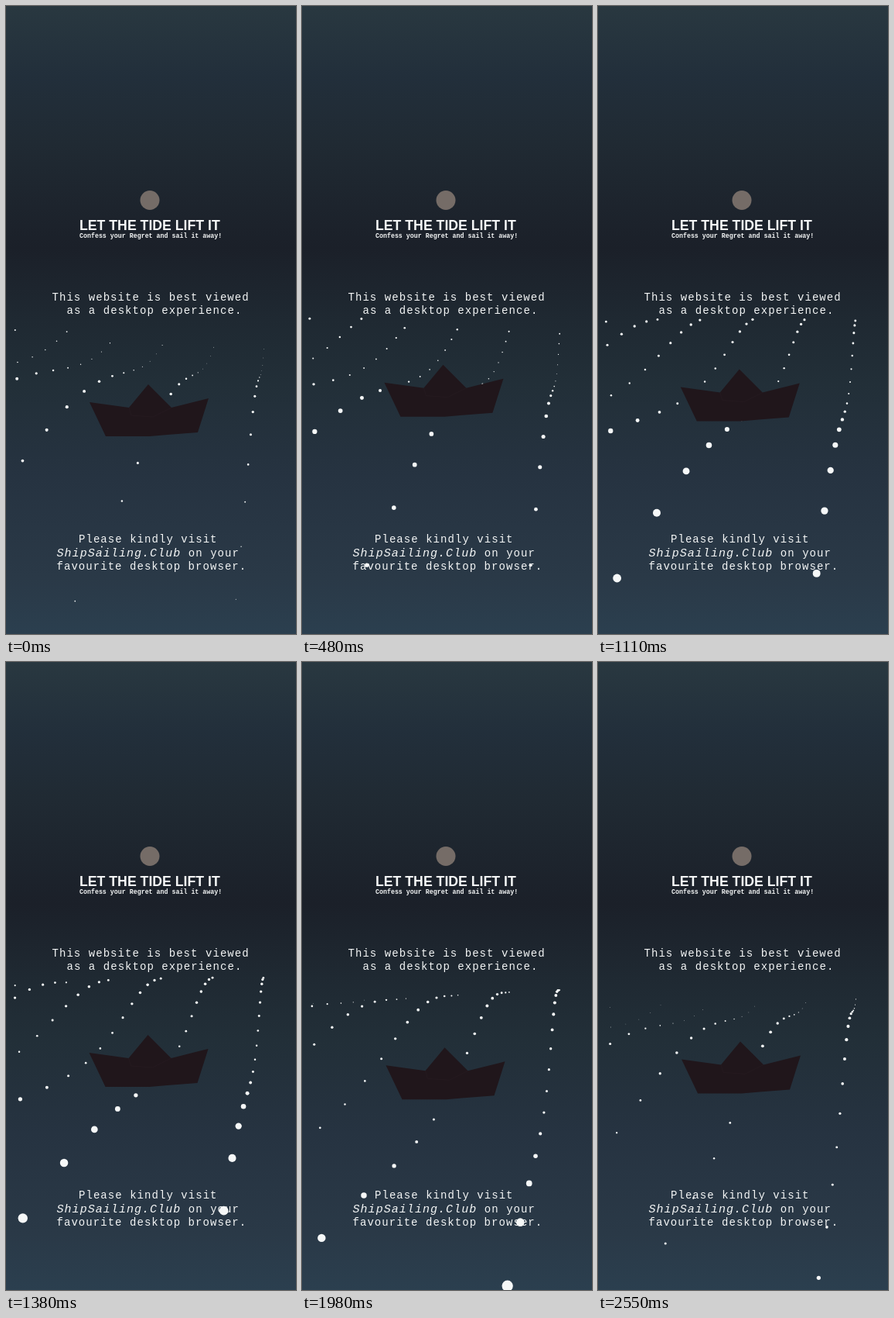
An HTML page that plays this animation: 375x810 px, repeating every 2.58 s.

```html
<!DOCTYPE html>
<html lang="en">
<head>
<meta charset="utf-8">
<title>Paper boat</title>
<style>
  html, body { margin: 0; width: 100%; height: 100%; overflow: hidden; background: #1b222b; }
  svg { display: block; width: 375px; height: 810px; }
  text { fill: #f4f6f6; white-space: pre; }
  .mono { font: 14px "Liberation Mono", monospace; letter-spacing: 1.05px; }
  .mono .site { font-size: 15px; font-style: italic; }
  .title { font: bold 17.7px "Liberation Sans", sans-serif; }
  .tagline { font: bold 8.3px "Liberation Mono", monospace; }
</style>
</head>
<body>
<svg viewBox="0 0 375 810">
  <defs>
    <linearGradient id="night" x2="0" y2="1">
      <stop offset="0" stop-color="#293840"/>
      <stop offset=".11" stop-color="#222f3b"/>
      <stop offset=".22" stop-color="#202a33"/>
      <stop offset=".385" stop-color="#1b2029"/>
      <stop offset=".5" stop-color="#1f2932"/>
      <stop offset=".6" stop-color="#222f38"/>
      <stop offset=".75" stop-color="#263341"/>
      <stop offset=".91" stop-color="#2a3947"/>
      <stop offset="1" stop-color="#2b3f4f"/>
    </linearGradient>
  </defs>
  <rect width="375" height="810" fill="url(#night)"/>

  <circle cx="186" cy="250.5" r="12.5" fill="#756c67"/>
  <text class="title" x="95" y="289">LET THE TIDE LIFT IT</text>
  <text class="tagline" x="95" y="299">Confess your Regret and sail it away!</text>

  <g id="dots" fill="#f6f8f8"></g>
  <g id="boat">
    <path d="M108 512 159 519 184 489 214 519 262 507 248 551 209 554 186 556 129 556Z" fill="#20161b"/>
    <path d="M159 519 162 529 190 531 214 519" fill="none" stroke="#271c21" stroke-width=".7"/>
  </g>

  <g class="mono">
    <text x="59.5" y="380">This website is best viewed</text>
    <text x="78.5" y="397">as a desktop experience.</text>
    <text x="94" y="692">Please kindly visit</text>
    <text x="65.5" y="710"><tspan class="site">ShipSailing.Club</tspan> on your</text>
    <text x="65.5" y="727">favourite desktop browser.</text>
  </g>
</svg>
<script>
const LOOP = 2580, STEP = 30;
const FOCAL = 1350, CENTER_X = 187.5, CENTER_Y = 405;
const SPEED = 4.43, HEIGHT = 0.19;
const { cos, max, PI } = Math;
const boat = document.getElementById('boat');
const layer = document.getElementById('dots');

// Grid of floating lights: columns run left, rows run towards the viewer.
const dots = [];
for (let col = 0; col < 6; col++) {
  for (let row = col > 3 ? -1 : 0; row < 17; row++) {
    const el = document.createElementNS('http://www.w3.org/2000/svg', 'circle');
    layer.append(el);
    dots.push({ col, row, el });
  }
}

function placeDot({ col, row, el }, t) {
  const across = cos(0.3 * (col + SPEED * (t - 1.66)));
  const along = cos(0.5 * (row + 4.47 - SPEED * t));
  const drop = -HEIGHT * (across + along);
  const scale = FOCAL / (20.47 - row - 0.17 * col + 0.45 * drop);
  el.setAttribute('cx', CENTER_X + scale * (2.21 - 0.121 * row - col + 0.07 * drop));
  el.setAttribute('cy', CENTER_Y + scale * (0.343 + 0.08 * row + 0.01 * col + drop));
  el.setAttribute('r', max(0.35, 0.006 * scale * (2 + across + along)));
}

function placeBoat(t) {
  const w = 2000 * PI / LOOP;
  const dy = 20 * cos(w * (t - 2.05)) + 2.5 * cos(2 * w * (t - 2.57)) - 9;
  boat.setAttribute('transform', `translate(${0.06 * dy} ${dy})`);
}

const start = performance.now();
function draw(now) {
  const elapsed = max(0, now - start) % LOOP;
  const t = Math.floor(elapsed / STEP) * STEP / 1000;
  dots.forEach(dot => placeDot(dot, t));
  placeBoat(t);
  requestAnimationFrame(draw);
}
draw(start);
</script>
</body>
</html>
```
